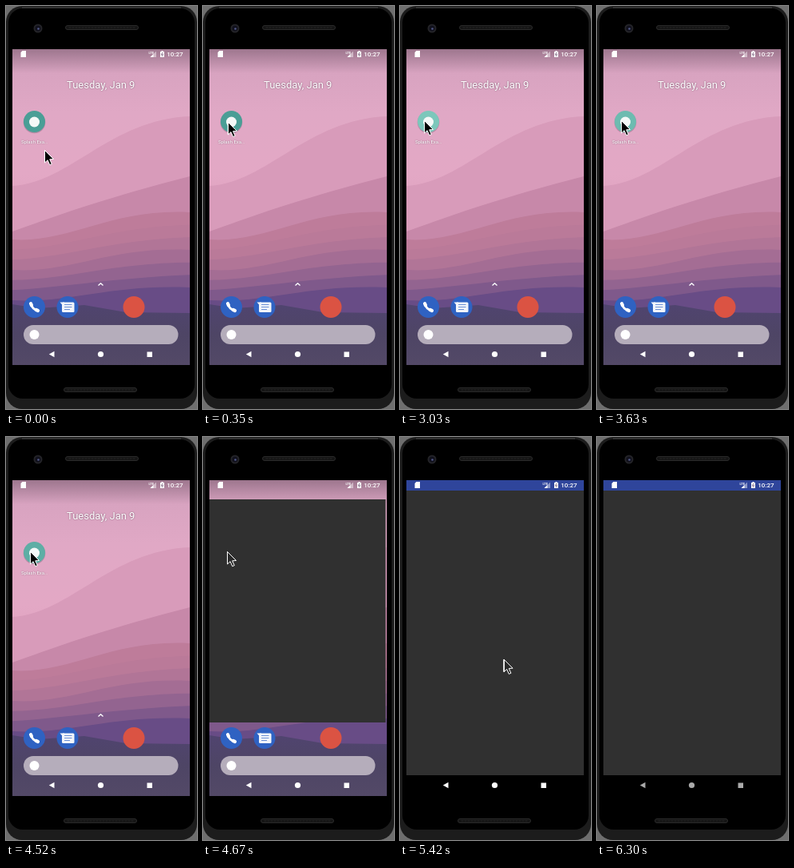
Animation, 239 px wide and 504 px high, one loop 8000 ms. Source, as an HTML page with a canvas:

```html
<!DOCTYPE html>
<html lang="en">
<head>
<meta charset="utf-8">
<title>Phone app launch</title>
<style>
  html, body { margin: 0; width: 100%; height: 100%; overflow: hidden; background: #000; }
  canvas { display: block; width: 239px; height: 504px; }
</style>
</head>
<body>
<canvas id="stage" width="239" height="504"></canvas>
<script>
const LOOP = 8000;
const ctx = document.getElementById('stage').getContext('2d');
const FONT = 'Roboto, "Open Sans", sans-serif';

const TICK = 149, OFFSET = 42;
const PRESS = 20, LAUNCH = 31, GROWN = 32, OPEN = 33, LEAVE = 34, GONE = 42;

const clamp = p => Math.min(1, Math.max(0, p));
const lerp = (a, b, p) => a + (b - a) * p;
const mix = (a, b, p) => `rgb(${a.map((v, i) => Math.round(lerp(v, b[i], p)))})`;

function rect(x, y, w, h, color) {
  ctx.fillStyle = color;
  ctx.fillRect(x, y, w, h);
}

function disc(x, y, r, color) {
  ctx.fillStyle = color;
  ctx.beginPath();
  ctx.arc(x, y, r, 0, Math.PI * 2);
  ctx.fill();
}

function pill(x, y, w, h, r, fill, stroke) {
  ctx.beginPath();
  ctx.roundRect(x, y, w, h, r);
  if (fill) { ctx.fillStyle = fill; ctx.fill(); }
  if (stroke) { ctx.strokeStyle = stroke; ctx.lineWidth = 1; ctx.stroke(); }
}

function shape(points, fill, stroke, width = 1) {
  ctx.beginPath();
  points.forEach(([x, y]) => ctx.lineTo(x, y));
  if (fill) { ctx.closePath(); ctx.fillStyle = fill; ctx.fill(); }
  if (stroke) { ctx.strokeStyle = stroke; ctx.lineWidth = width; ctx.stroke(); }
}

function text(str, x, y, font, align = 'left') {
  ctx.font = font + ' ' + FONT;
  ctx.textAlign = align;
  ctx.fillStyle = '#fff';
  ctx.fillText(str, x, y);
}

function vertical(y0, y1, colors) {
  const g = ctx.createLinearGradient(0, y0, 0, y1);
  colors.forEach((c, i) => g.addColorStop(i / (colors.length - 1), c));
  return g;
}

// Everything below a soft wave running from left height to right height
function dune(left, right, bulge, color) {
  ctx.fillStyle = color;
  ctx.beginPath();
  ctx.moveTo(8, left);
  ctx.bezierCurveTo(80, left + bulge, 130, right - bulge, 230, right);
  ctx.lineTo(230, 449);
  ctx.lineTo(8, 449);
  ctx.fill();
}

function phone() {
  rect(0, 0, 239, 504, '#6e6e6e');
  pill(0, 0, 239, 504, 20, '#1c1c1c');
  pill(3, 3, 233, 488, 18, '#000');
  shape([[20, 2], [219, 2]], null, '#4a4a4a');
  disc(40, 28, 5.5, '#242428');
  disc(40, 28, 3.5, '#10101c');
  disc(40.5, 28.5, 1.3, '#535a8a');
  for (const [x, y] of [[74.5, 24.5], [72.5, 477.5]]) {
    pill(x, y, 91, 5, 2.5, '#141414', '#2b2b2b');
    ctx.setLineDash([3, 1]);
    shape([[x + 4, y + 2.5], [x + 87, y + 2.5]], null, '#262626');
    ctx.setLineDash([]);
  }
}

function wallpaper() {
  rect(8, 54, 222, 395, vertical(54, 290, ['#d3a0bd', '#e0a8c5', '#e3a8c5', '#dc9dbc']));
  dune(225, 138, -4, '#d89bba');
  dune(282, 213, -26, '#c788a9');
  const bands = 7;
  for (let i = 0; i < bands; i++) {
    const p = i / (bands - 1);
    const color = mix([190, 124, 154], [104, 76, 134], p ** 1.7);
    dune(lerp(292, 368, p), lerp(258, 352, p), 5 * Math.cos(i * 2), color);
  }
  shape([[8, 373], [40, 378], [98, 374], [150, 383], [230, 384], [230, 449], [8, 449]],
    vertical(374, 449, ['#50446f', '#4e4565', '#534967']));
  rect(8, 54, 222, 30, vertical(54, 84, ['rgba(70,50,65,.38)', 'rgba(70,50,65,0)']));
}

function dock() {
  disc(35.5, 376.5, 13.5, '#2f62c2');
  ctx.lineCap = 'round';
  ctx.beginPath();
  ctx.moveTo(31.3, 372.5);
  ctx.quadraticCurveTo(32.5, 379, 39.8, 381);
  ctx.strokeStyle = '#fff';
  ctx.lineWidth = 2.8;
  ctx.stroke();
  shape([[31, 372.2], [32, 374.3]], null, '#fff', 4.2);
  shape([[37.8, 380], [40, 381]], null, '#fff', 4.2);
  ctx.lineCap = 'butt';

  disc(77, 376.5, 13.5, '#2f62c2');
  pill(70, 370.5, 15.5, 12.5, 1.5, '#f2f5fb');
  shape([[67.5, 370.5], [73, 370.5], [71, 374.5]], '#f2f5fb');
  for (let i = 0; i < 3; i++) rect(73, 373 + 3 * i, i < 2 ? 9.5 : 7, 1, '#6b8fd4');

  disc(160, 376.5, 13.5, '#db5343');
  pill(22, 399, 193.5, 24, 12, '#b5adbb');
  disc(35.5, 411, 6, '#fff');
}

// Pressing lights the icon up, then the glow fades in steps
function iconColor(n) {
  const glow = n < PRESS ? 0 : Math.max(0.4, 1 - 0.3 * Math.floor((n - PRESS) / 4));
  return mix([74, 158, 150], [124, 199, 187], glow);
}

function home(n) {
  wallpaper();
  ctx.shadowColor = 'rgba(50,25,45,.6)';
  ctx.shadowBlur = 2;
  ctx.shadowOffsetY = 0.7;
  text('Tuesday, Jan 9', 118.7, 102.5, '13px', 'center');
  text('Splash Exa…', 35.5, 171.5, '6px', 'center');
  ctx.shadowColor = 'transparent';
  disc(35.5, 145.5, 13.8, 'rgba(60,50,70,.25)');
  disc(35.5, 144.5, 13.5, iconColor(n));
  disc(35.5, 145, 6.5, '#f4f8f7');
  shape([[115.5, 349.5], [118.5, 346.7], [121.5, 349.5]], null, '#fff', 1.3);
  dock();
}

function appWindow(n) {
  if (n < GROWN) {
    rect(8, 78, 220.5, 279, '#303030');
    return;
  }
  const open = n >= OPEN;
  rect(8, open ? 54 : 57, 222, 13, '#2f459b');
  rect(8, 67, 222, 356, '#303030');
  rect(8, 423, 222, open ? 26 : 10, '#000');
}

function statusBar() {
  shape([[20.5, 56], [25, 56], [25, 64], [18.5, 64], [18.5, 58]], '#fff');
  text('LTE', 178.5, 60, 'bold 4px');
  shape([[188, 56.5], [188, 64], [180.5, 64]], 'rgba(255,255,255,.45)');
  shape([[184.5, 60], [184.5, 64], [180.5, 64]], '#fff');
  rect(194.5, 56, 2, 1, '#fff');
  rect(193, 57, 5, 7, '#fff');
  shape([[196, 58], [194.2, 61], [196.6, 60.5], [195, 63]], null, '#8b7890');
  text('10:27', 201.3, 63, '500 8px');
}

function navBar(n) {
  const dim = clamp((n - LEAVE - 2) / 6);
  const color = mix([255, 255, 255], [170, 170, 170], dim);
  shape([[53.8, 435.5], [60.5, 431.8], [60.5, 439.2]], color);
  disc(118.5, 435.5, 3.6, color);
  rect(176.5, 432.5, 6.5, 6.5, color);
}

// Glides to the icon, rests, then swings out at the lower right
function pointerAt(n) {
  const icon = [30, 143], turn = [152, 308], turnAt = LEAVE + 3.5;
  const leg = (a, b, p) => [lerp(a[0], b[0], p), lerp(a[1], b[1], p)];
  if (n < LEAVE) return leg([48, 180], icon, n < 6 ? 0.95 * clamp(n / 2) : 1);
  if (n < turnAt) return leg(icon, turn, 1 - (1 - (n - LEAVE) / 3.5) ** 2);
  return leg(turn, [220, 499], ((n - turnAt) / 3.5) ** 1.2);
}

function pointer(n) {
  const [x, y] = pointerAt(n);
  const outline = [[0, 0], [0, 15.5], [3.6, 12.2], [6.2, 18.2], [8.8, 17.1], [6.2, 11.3], [11, 11]];
  const points = outline.map(([dx, dy]) => [x + 0.5 + dx, y + 0.5 + dy]);
  points.push(points[0], points[1]);
  ctx.lineJoin = 'round';
  shape(points, n < LAUNCH ? '#000' : '#2a2a2a', '#fff');
}

function draw(t) {
  const n = Math.max(0, Math.floor((t - OFFSET) / TICK));
  phone();
  if (n < OPEN) home(n);
  if (n >= LAUNCH) appWindow(n);
  statusBar();
  navBar(n);
  if (n < GONE) pointer(n);
}

const start = performance.now();
function tick() {
  draw((performance.now() - start) % LOOP);
  requestAnimationFrame(tick);
}
tick();
</script>
</body>
</html>
```
